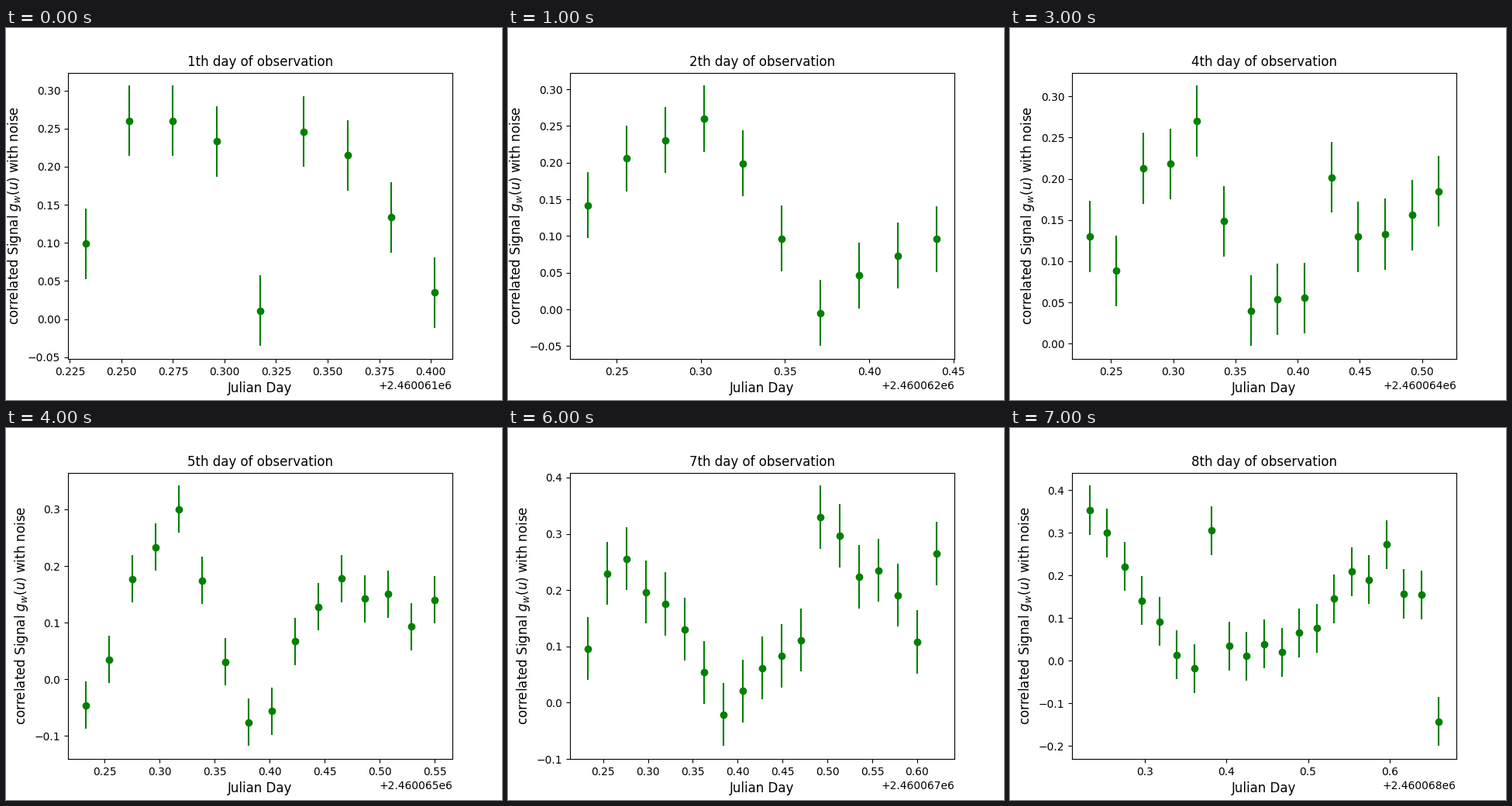
A matplotlib script that plays this animation: 640 px wide and 480 px high, repeating every 8 s.

```python
import numpy as np
import matplotlib.pyplot as plt
from matplotlib.animation import FuncAnimation

FIRST_DAY = 2460061
START = 0.2326  # time of the first reading, as a fraction of a day
PER_DAY = 48    # one reading every half hour
SCATTER = 0.03

# Per night: end of the watch, error bar, key readings {index: signal}
NIGHTS = [
    (0.4020, 0.0463, {0: .099, 1: .260, 3: .233, 4: .011, 5: .246, 8: .035}),
    (0.4403, 0.0450, {0: .142, 3: .260, 6: -.005, 9: .096}),
    (0.4768, 0.0436, {0: .120, 2: .186, 6: .145, 7: -.050, 10: .243, 11: .159}),
    (0.5136, 0.0430, {0: .130, 4: .270, 6: .040, 13: .185}),
    (0.5500, 0.0417, {0: -.046, 4: .300, 7: -.076, 10: .128, 15: .140}),
    (0.5859, 0.0475, {0: .325, 1: .039, 4: .166, 9: -.017, 13: .176, 15: .006,
                      16: .235}),
    (0.6220, 0.0559, {0: .096, 2: .256, 7: -.0212, 11: .111, 12: .3297,
                      17: .108, 18: .265}),
    (0.6602, 0.0575, {0: .3535, 6: -.018, 7: .306, 8: .035, 11: .020,
                      17: .273, 19: .155, 20: -.1425}),
]

fig, ax = plt.subplots(figsize=(6.4, 4.8), dpi=100)


def readings(count, keys, seed):
    """Join the key readings and scatter the ones between them."""
    index, value = list(keys), list(keys.values())
    signal = np.interp(np.arange(count), index, value)
    signal += np.random.default_rng(seed).normal(0, SCATTER, count)
    signal = np.clip(signal, min(value), max(value))
    signal[index] = value
    return signal


def draw_night(i):
    end, error, keys = NIGHTS[i]
    count = int((end - START) * PER_DAY) + 1
    times = FIRST_DAY + i + np.linspace(START, end, count)
    ax.clear()
    ax.errorbar(times, readings(count, keys, i), yerr=error,
                fmt="o", color="green")
    ax.set_title(f"{i + 1}th day of observation")
    ax.set_xlabel("Julian Day", fontsize=12)
    ax.set_ylabel("correlated Signal $g_w(u)$ with noise", fontsize=12)


anim = FuncAnimation(fig, draw_night, frames=len(NIGHTS), interval=1000,
                     repeat=True)
plt.show()
```
